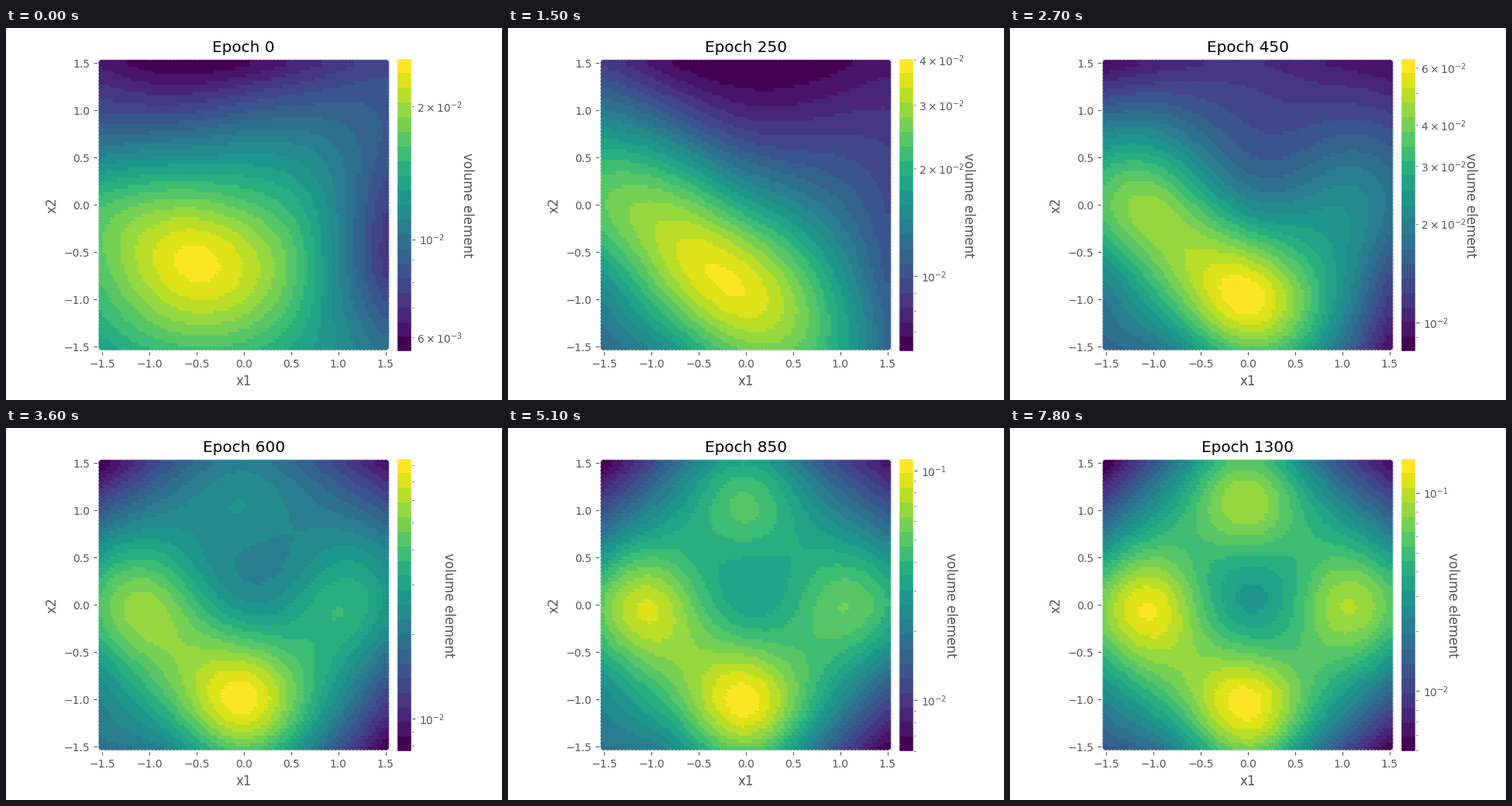
Recreate the animation shown at these times as a matplotlib script. Size 640x480 px, loop 8 s.

```python
import numpy as np
import matplotlib.pyplot as plt
from matplotlib.animation import FuncAnimation
from matplotlib.colors import LogNorm

plt.style.use("ggplot")

WIDTH, HEIGHT, DPI = 640, 480, 100
BANDS = 20
GRID = 80
TICK_MS, LOOP_MS, STEP_MS, EPOCHS_PER_STEP = 100, 8000, 300, 50

# Landmarks: the border of the square (row by row from the top),
# then the centres N, W, middle, E, S, then the diagonals NW, NE, SW, SE.
SIDE = np.linspace(-1.5, 1.5, 5)
LANDMARKS = np.array(
    [(x, 1.5) for x in SIDE]
    + [(x, y) for y in SIDE[3:0:-1] for x in (-1.5, 1.5)]
    + [(x, -1.5) for x in SIDE]
    + [(0, 1), (-1, 0), (0, 0), (1, 0), (0, -1)]
    + [(x, y) for y in (0.5, -0.5) for x in (-0.5, 0.5)]
)

# Height of the surface at each landmark, in colour bands.
LEVELS = {
    0: [1.8, 0.1, 0.8, 2.8, 4.5, 7, 5.9, 13.9, 4.2, 14.2, 4,
        11.3, 13.6, 13.5, 11, 7.5,
        6, 15.4, 14.6, 9, 17, 10.4, 10.1, 19.3, 14.6],
    150: [5, 1.2, 0.1, 1.2, 2.5, 10.7, 4.2, 14.8, 4.3, 12, 6.6,
          8.3, 12, 15.4, 14.6, 10.3,
          3.9, 16, 13.8, 7.2, 18, 10.5, 7.2, 19.2, 14.3],
    350: [2, 0.9, 0.3, 0.1, 1, 10, 4, 14.7, 6, 9.2, 4.7,
          6.3, 9.3, 14.8, 12, 2.7,
          2.2, 16.5, 10.3, 8.2, 19.6, 8.8, 5.2, 18, 13.3],
    600: [0.2, 5.8, 8.6, 6, 1.5, 8.8, 8, 14.2, 10.8, 10, 6,
          7.6, 9.5, 14.5, 8.5, 0.3,
          10, 16.7, 10.5, 13, 19.7, 10.6, 9.1, 16.3, 14],
    850: [0.2, 7, 12, 6.8, 1.7, 8.3, 8.2, 15, 13, 10.5, 7.2,
          7.8, 9.6, 15, 8, 0.3,
          14.3, 18.2, 11.5, 15, 19.7, 12.7, 12, 16.2, 14.3],
    1300: [0.1, 8.5, 14.6, 8, 1.4, 8.8, 9, 15.8, 14.7, 11, 8.7,
           5.6, 9, 15.5, 8.3, 0.5,
           16.8, 19.1, 10.8, 17, 19.7, 13.6, 13, 16, 14.2],
}

# Smallest and largest volume element over training.
RANGES = {
    0: (5.57e-3, 2.57e-2),
    150: (5.07e-3, 3.21e-2),
    350: (7.77e-3, 5.16e-2),
    600: (7.64e-3, 8.43e-2),
    850: (5.97e-3, 0.1128),
    1100: (5.23e-3, 0.135),
    1300: (4.96e-3, 0.149),
}


def time_curve(times, values):
    """Smooth curve through values at uneven times (cubic Hermite)."""
    times = np.array(times, float)
    slopes = np.gradient(values, times, axis=0, edge_order=2)

    def at(t):
        i = int(np.clip(np.searchsorted(times, t, "right") - 1,
                        0, len(times) - 2))
        h = times[i + 1] - times[i]
        s = (t - times[i]) / h
        return (values[i] * (1 + 2 * s) * (1 - s) ** 2
                + slopes[i] * h * s * (1 - s) ** 2
                + values[i + 1] * s * s * (3 - 2 * s)
                + slopes[i + 1] * h * s * s * (s - 1))

    return at


def distance_cubed(a, b):
    return np.linalg.norm(a[:, None] - b[None], axis=2) ** 3


def with_ones(points):
    return np.column_stack([np.ones(len(points)), points])


def spread(points, levels):
    """Polyharmonic spline through the landmarks, one row per epoch."""
    plane = with_ones(LANDMARKS)
    system = np.block([[distance_cubed(LANDMARKS, LANDMARKS), plane],
                       [plane.T, np.zeros((3, 3))]])
    weights = np.linalg.solve(system, np.vstack([levels.T, np.zeros((3, len(levels)))]))
    basis = np.hstack([distance_cubed(points, LANDMARKS), with_ones(points)])
    return (basis @ weights).T


axis = np.linspace(-1.5, 1.5, GRID)
points = np.column_stack([a.ravel() for a in np.meshgrid(axis, axis)])
surface = time_curve(list(LEVELS), spread(points, np.array(list(LEVELS.values()))))
log_range = time_curve(list(RANGES), np.log10(list(RANGES.values())))


def state(epoch):
    lo, hi = log_range(epoch)
    height = np.clip(surface(epoch) / BANDS, 0, 1)
    return 10 ** (lo + (hi - lo) * height), 10 ** lo, 10 ** hi


def add_axes(left, bottom, width, height):
    return fig.add_axes([left / WIDTH, bottom / HEIGHT,
                         width / WIDTH, height / HEIGHT])


fig = plt.figure(figsize=(WIDTH / DPI, HEIGHT / DPI), dpi=DPI)
ax = add_axes(117.8, 62.7, 378, 378)
cax = add_axes(504.4, 62.7, 18.6, 378)

values, low, high = state(0)
dots = ax.scatter(*points.T, c=values, cmap=plt.get_cmap("viridis", BANDS),
                  norm=LogNorm(low, high))
ax.set(xlim=(-1.55, 1.55), ylim=(-1.55, 1.55), xlabel="x1", ylabel="x2")
title = ax.set_title("Epoch 0")
bar = fig.colorbar(dots, cax=cax)
bar.set_label("volume element", rotation=270, labelpad=10)


def update(frame):
    epoch = EPOCHS_PER_STEP * (frame * TICK_MS // STEP_MS)
    values, low, high = state(epoch)
    dots.set_array(values)
    dots.set_clim(low, high)
    title.set_text(f"Epoch {epoch}")
    return dots, title


anim = FuncAnimation(fig, update, frames=LOOP_MS // TICK_MS,
                     interval=TICK_MS, repeat=True, repeat_delay=0)
plt.show()
```
